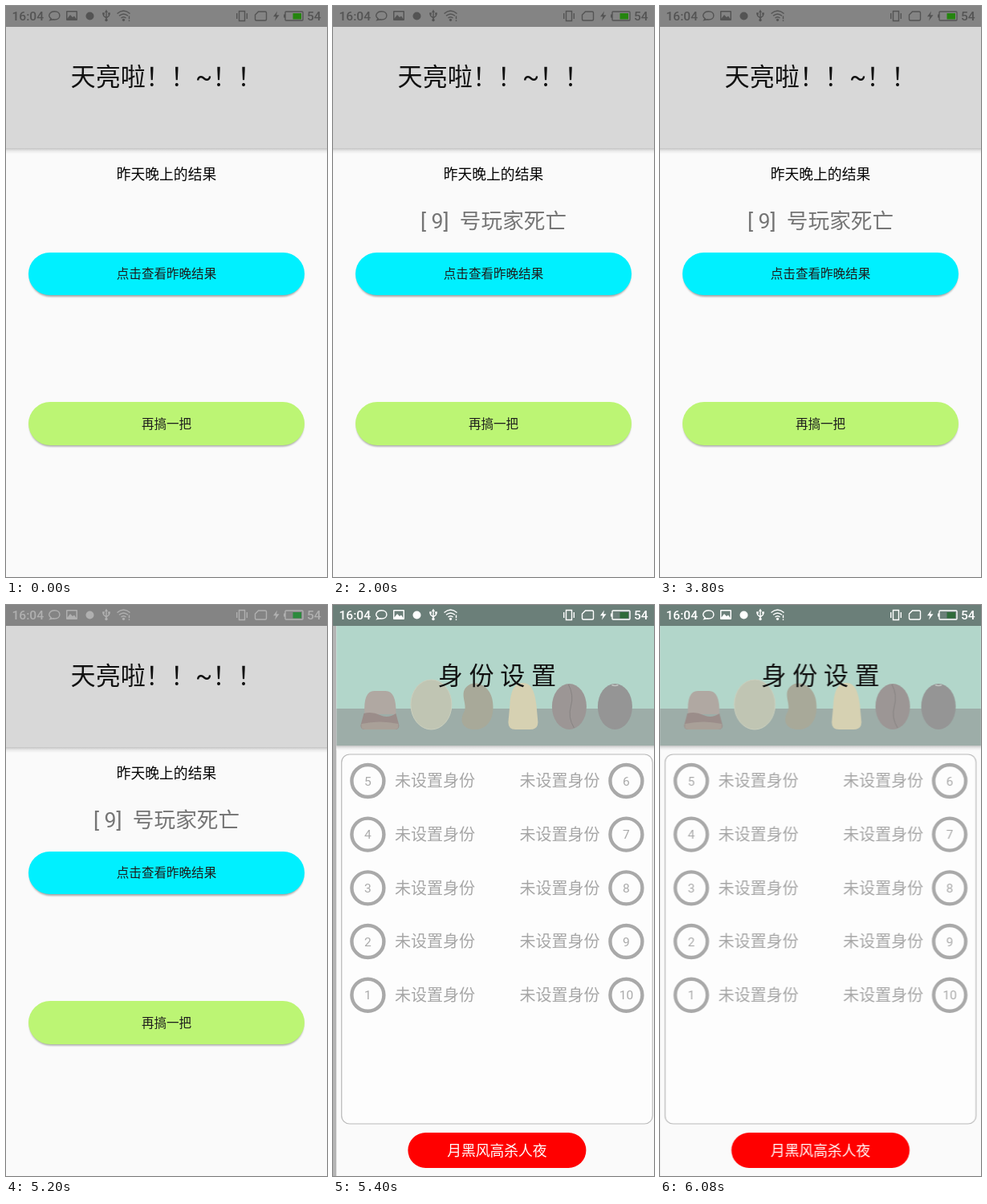
These frames come from a looping animation (400 by 711 pixels, 6.4 s). An HTML page:

```html
<!DOCTYPE html>
<html lang="zh-CN">
<head>
<meta charset="utf-8">
<title>身份设置</title>
<style>
  html, body { margin: 0; width: 100%; height: 100%; overflow: hidden; background: #fafafa; }
  svg { display: block; width: 400px; height: 711px; }
  text { font-family: Roboto, "Noto Sans CJK SC", "Noto Sans CJK", sans-serif; white-space: pre; }
  .mid { text-anchor: middle; }
  .title { font-size: 31.1px; fill: #111; }
  .label { font-size: 17.78px; }
  .button { font-size: 15.56px; font-weight: 500; fill: #1c1c1c; }
  .status { font-size: 15.56px; font-weight: 500; fill: currentColor; }
  .seat { font-size: 15.56px; fill: #aaa; }
  .role { font-size: 20px; fill: #a6a6a6; }
  .soft { filter: blur(1.3px); }
  .softer { filter: blur(2.6px); }
  .line { fill: none; stroke: currentColor; stroke-width: 1.4; }
</style>
</head>
<body>
<svg viewBox="0 0 400 711">
  <defs>
    <linearGradient id="shade" x2="0" y2="1">
      <stop stop-color="#c4c4c4"/>
      <stop offset=".5" stop-color="#e9e9e9"/>
      <stop offset="1" stop-color="#fafafa"/>
    </linearGradient>
    <clipPath id="column"><rect x="28" y="480" width="344" height="90"/></clipPath>
  </defs>

  <g id="morning">
    <rect width="400" height="711" fill="#fafafa"/>
    <rect y="26" width="400" height="151" fill="#d8d8d8"/>
    <rect y="177" width="400" height="7" fill="url(#shade)"/>
    <text class="title mid" x="200" y="99">天亮啦！！~！！</text>
    <text class="label mid" x="200" y="215.5">昨天晚上的结果</text>
    <text id="result" class="mid" x="200" y="277" font-size="26.67" fill="#757575">[ 9]  号玩家死亡</text>

    <rect class="soft" x="29" y="309" width="342" height="53" rx="26.5" fill="#000" opacity=".34"/>
    <rect x="28" y="307" width="344" height="53" rx="26.5" fill="#00f0ff"/>
    <text class="button mid" x="200" y="339.3">点击查看昨晚结果</text>

    <rect class="soft" x="29" y="495.5" width="342" height="53" rx="26.5" fill="#000" opacity=".34"/>
    <g id="lift" clip-path="url(#column)">
      <rect class="softer" x="28" y="498.5" width="344" height="54" rx="27" fill="#000" opacity=".38"/>
    </g>
    <rect x="28" y="493" width="344" height="54" rx="27" fill="#bcf574"/>
    <text class="button mid" x="200" y="526">再搞一把</text>
  </g>

  <g id="setup">
    <rect x="-5" width="5" height="711" fill="#b5b5b5"/>
    <rect width="400" height="711" fill="#fafafa"/>
    <rect y="26" width="400" height="103" fill="#b2d6ca"/>
    <rect y="129" width="400" height="46" fill="#9dada8"/>
    <g id="beans">
      <path d="M35 136Q33 107 47 107H61Q75 107 74 136Z" fill="#b0a8a2"/>
      <path d="M34 135Q44 132 54 137T74 135L78 150Q78 155 73 155H35Q30 155 30 150Z" fill="#9b8d8a"/>
      <path d="M31 148Q54 143 77 148V151Q77 155 72 155H36Q31 155 31 151Z" fill="#a9a098"/>
      <ellipse cx="118" cy="124" rx="25.5" ry="31" fill="#c0c5b3" stroke="#cbd0be"/>
      <path d="M163 101C172 93 190 99 194 117C198 137 191 154 174 155C158 156 152 145 159 133C164 124 152 110 163 101Z" fill="#a8a999"/>
      <path d="M232 97C243 97 247 108 249 124L251 146Q251 155 241 155H223Q214 155 214 146L216 124C217 108 221 97 232 97Z" fill="#d6d1b2"/>
      <ellipse cx="290" cy="126.5" rx="21.5" ry="28.5" fill="#9c9695"/>
      <path d="M289 99Q296 112 292 126T296 153" fill="none" stroke="#878382"/>
      <ellipse cx="347" cy="126.5" rx="21.5" ry="28.5" fill="#959595"/>
      <path d="M343 99.5Q347 101.5 351 99.5" fill="none" stroke="#c2c5c2" stroke-width="1.5"/>
    </g>
    <rect y="175" width="400" height="6" fill="url(#shade)"/>
    <text class="title mid" x="200" y="99">身 份 设 置</text>
    <rect x="6.3" y="186" width="387.5" height="460" rx="10" fill="#fdfdfd" stroke="#b9b9b9" stroke-width="1.2"/>
    <g id="seats"></g>
    <rect x="89" y="657" width="222" height="44" rx="22" fill="#f00"/>
    <text class="label mid" x="200" y="685.5" fill="#fff">月黑风高杀人夜</text>
  </g>

  <rect id="bar" width="400" height="26"/>
  <g id="icons">
    <text class="status" x="7.5" y="18">16:04</text>
    <path class="line" d="M55 17.5L56.2 15.9C51 12 55 6.8 60.5 6.8C69 6.8 69 17 60.5 17L58.5 16.8Z" stroke-width="1.2"/>
    <path d="M76 6H88Q89 6 89 7V17Q89 18 88 18H76Q75 18 75 17V7Q75 6 76 6ZM76.5 15.5L80 11L83 14L85 12.5L87.5 16V7.5H76.5Z" fill="currentColor" fill-rule="evenodd"/>
    <circle cx="104.5" cy="12.5" r="5" fill="currentColor"/>
    <path class="line" d="M125 7V18M121.5 9.5V12L125 15L128.5 12V9.5" stroke-width="1.2"/>
    <path d="M125 4.5L127 8H123ZM120.2 8.3H122.8V10.8H120.2ZM127.2 8.3H129.8V10.8H127.2Z" fill="currentColor"/>
    <circle cx="125" cy="17.5" r="1.7" fill="currentColor"/>
    <path class="line" d="M138.5 9.5Q146.5 2.5 154.5 9.5M141 12.3Q146.5 7.6 152 12.3M143.5 15Q146.5 12.4 149.5 15"/>
    <circle cx="146.5" cy="17.3" r="1.6" fill="currentColor"/>
    <path class="line" d="M153.5 12.5V16.3M153.5 17.5V19"/>
    <path class="line" d="M290.5 6.5H297.5V18.5H290.5ZM287.7 9V16M300.3 9V16" stroke-width="1.8"/>
    <path class="line" d="M314.5 7H323Q324.5 7 324.5 8.5V16.5Q324.5 18 323 18H312Q310.5 18 310.5 16.5V11Z" stroke-width="1.6"/>
    <path d="M338 6.5L333 13.3H336.3L335 18.5L340.5 11.3H337Z" fill="currentColor"/>
    <path class="line" d="M349 7H369Q370 7 370 8V17Q370 18 369 18H349Q348 18 348 17V8Q348 7 349 7ZM346.7 10.5V14.5"/>
    <rect id="charge" x="357.5" y="9" width="10.5" height="7.5"/>
    <text class="status" x="375" y="18">54</text>
  </g>
</svg>
<script>
const LOOP = 6400;
const byId = id => document.getElementById(id);

const seat = (cx, cy, number, textX) => `
  <circle cx="${cx}" cy="${cy}" r="20" fill="none" stroke="#a9a9a9" stroke-width="4.4"/>
  <text class="seat mid" x="${cx}" y="${cy + 5.7}">${number}</text>
  <text class="role" x="${textX}" y="${cy + 7.3}">未设置身份</text>`;

byId('seats').innerHTML = [0, 1, 2, 3, 4].map(row => {
  const y = 219 + row * 66.67;
  return seat(39, y, 5 - row, 72.5) + seat(361, y, 6 + row, 228);
}).join('');

// Each step is [start in ms, value]; values hold until the next step.
function hold(id, property, steps) {
  const frames = steps.map(([at, value]) =>
    ({ offset: at / LOOP, [property]: value, easing: 'step-end' }));
  frames.push({ offset: 1, [property]: steps.at(-1)[1] });
  byId(id).animate(frames, { duration: LOOP, iterations: Infinity });
}

hold('result', 'opacity', [[0, 0], [2000, 1]]);
hold('lift', 'opacity', [[0, 0], [5000, 1], [5200, 0]]);
hold('setup', 'opacity', [[0, 0], [5400, 1]]);
hold('setup', 'transform', [[0, 'translateX(4.4px)'], [5600, 'translateX(0px)']]);
hold('bar', 'fill', [[0, '#848484'], [5400, '#6b7f79']]);
hold('icons', 'color', [[0, '#545454'], [5200, '#b0b0b0'], [5400, '#ffffff']]);
hold('charge', 'fill', [[0, '#25850f'], [5200, '#2b8a3c'], [5400, '#2f6b3a']]);
</script>
</body>
</html>
```
